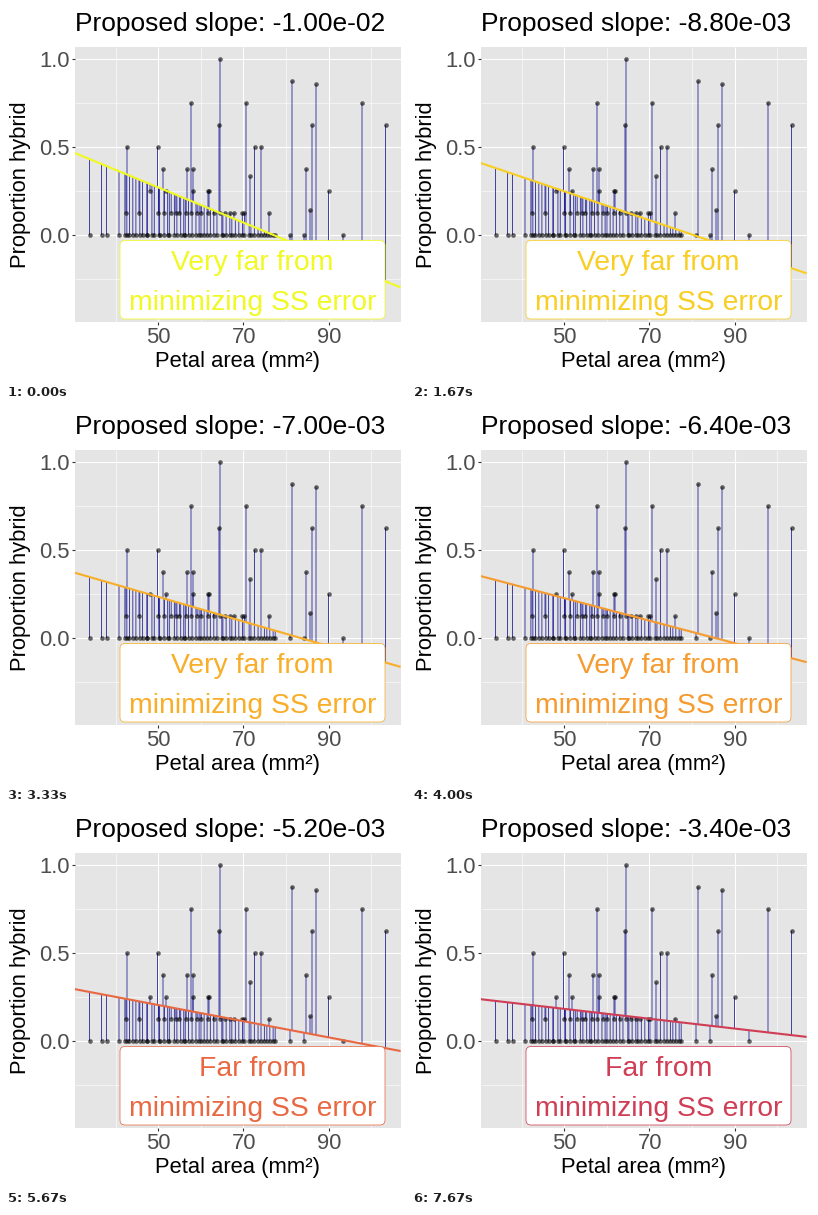
Recreate the animation shown at these times as a matplotlib script. Size 400 px wide and 375 px high, loop 8 s.

```python
import numpy as np
import matplotlib.pyplot as plt
from matplotlib.animation import FuncAnimation
from matplotlib.collections import LineCollection
from matplotlib.colors import LinearSegmentedColormap
from matplotlib.patches import FancyBboxPatch, Rectangle

plt.rcParams["font.family"] = "Liberation Sans"
W, H, DPI = 400, 375, 100
PT = 72 / DPI
LOOP, INTERVAL = 8000, 50
TICKS_PER_LOOP = 24
STEPS = TICKS_PER_LOOP // 2
LEFT, RIGHT, TOP, BOTTOM = 68.6, 394.6, 41, 316
X50, PX_PER_AREA = 152.2, 4.2625
MEAN_AREA, MEAN_RATIO = 62.2, 0.149
START_SLOPE, SLOPE_STEP = -0.01, 0.0006

HEAT = LinearSegmentedColormap.from_list(
    "heat", ["#f0f921", "#fac023", "#f0763b", "#d03e55"])


def x_px(area):
    return X50 + (area - 50) * PX_PER_AREA


def y_px(ratio):
    return 229.1 - 176 * ratio


def fit_px(x, slope):
    area = 50 + (x - X50) / PX_PER_AREA
    return y_px(MEAN_RATIO + slope * (area - MEAN_AREA))


def make_flowers():
    """Outlying flowers are placed; the two crowded low rows are scattered."""
    rng = np.random.default_rng(4)

    def crowd(start, stop, n):
        return np.linspace(start, stop, n) + rng.normal(0, 0.8, n)

    rows = {
        1: [214], 7 / 8: [286], 6 / 7: [310], 3 / 4: [185, 240, 356],
        5 / 8: [213, 306, 379.5], 1 / 2: [121, 151.5, 248.5, 255],
        3 / 8: [157, 181, 187, 300], 1 / 3: [244],
        1 / 4: [144, 160, 187, 202, 203, 322.5], 1 / 7: [304],
        1 / 8: [120, 133, 263, *crowd(153, 240, 17)],
        0: [83.5, 95.5, 100.5, 113, 284, 298, 337, *crowd(118, 270, 50)],
    }
    return np.array([(x, r) for r, xs in rows.items() for x in xs])


FLOWERS = make_flowers()

fig = plt.figure(figsize=(W / DPI, H / DPI), dpi=DPI, facecolor="white")
ax = fig.add_axes([0, 0, 1, 1])
ax.set(xlim=(0, W), ylim=(H, 0))
ax.axis("off")


def label(x, y, text, size, color="black", ha="center", **kw):
    return ax.text(x, y, text, fontsize=size * PT, color=color, ha=ha,
                   va="baseline", **kw)


def stroke(xs, ys, width, color, z=1):
    return ax.plot(xs, ys, color=color, lw=width * PT, zorder=z,
                   solid_capstyle="butt")[0]


panel = Rectangle((LEFT, TOP), RIGHT - LEFT, BOTTOM - TOP, fc="#e5e5e5",
                  ec="none", zorder=0)
ax.add_patch(panel)

for area in range(40, 101, 10):
    major = area in (50, 70, 90)
    x = x_px(area)
    stroke([x, x], [TOP, BOTTOM], 1.1 if major else 0.55, "white")
    if major:
        stroke([x, x], [BOTTOM, BOTTOM + 3], 1.1, "#333333")
        label(x + 0.3, 337, str(area), 22, "#4d4d4d")

for ratio in np.arange(-0.25, 1.01, 0.25):
    major = ratio in (0, 0.5, 1)
    y = y_px(ratio)
    stroke([LEFT, RIGHT], [y, y], 1.1 if major else 0.55, "white")
    if major:
        stroke([LEFT - 3, LEFT], [y, y], 1.1, "#333333")
        label(63.5, y + 8, f"{ratio:.1f}", 22, "#4d4d4d", "right")

label(231.5, 361, "Petal area (mm²)", 22)
label(20.3, 179, "Proportion hybrid", 22, rotation=90,
      rotation_mode="anchor")
title = label(68.6, 25, "", 26.4, ha="left")

residuals = LineCollection([], colors="#00008b", alpha=0.7, lw=PT, zorder=2)
residuals.set_snap(False)
ax.add_collection(residuals)
ax.scatter(FLOWERS[:, 0], y_px(FLOWERS[:, 1]), s=(4.6 * PT) ** 2, c="black",
           alpha=0.6, lw=0, zorder=3, snap=False)
fit = stroke([], [], 2.1, "black", 4)
fit.set_clip_path(panel)

box = FancyBboxPatch((114, 234.5), 265, 78.5, fc="white", lw=0.75 * PT,
                     boxstyle="round,pad=0,rounding_size=5", zorder=5)
ax.add_patch(box)
verdict = [label(246.5, 264, "", 28.45, zorder=6),
           label(246.5, 304.4, "minimizing SS error", 28.45, zorder=6)]


def update(frame):
    # The line moves on odd ticks; the title catches up on even ones.
    tick = ((frame + 1) * INTERVAL - 1) * TICKS_PER_LOOP // LOOP
    step = (tick + 1) // 2
    slope = START_SLOPE + SLOPE_STEP * step
    title_slope = START_SLOPE + SLOPE_STEP * (tick // 2)
    title.set_text(f"Proposed slope: {title_slope:.2e}")

    residuals.set_segments([[(x, y_px(r)), (x, fit_px(x, slope))]
                            for x, r in FLOWERS])
    ends = np.array([LEFT, RIGHT])
    fit.set_data(ends, fit_px(ends, slope))

    color = HEAT(step / STEPS)
    fit.set_color(color)
    box.set_edgecolor(color)
    for line in verdict:
        line.set_color(color)
    verdict[0].set_text("Very far from" if slope < -0.0053 else "Far from")
    return [title, residuals, fit, box, *verdict]


anim = FuncAnimation(fig, update, frames=LOOP // INTERVAL, interval=INTERVAL,
                     repeat=True, repeat_delay=0, blit=False)
plt.show()
```
